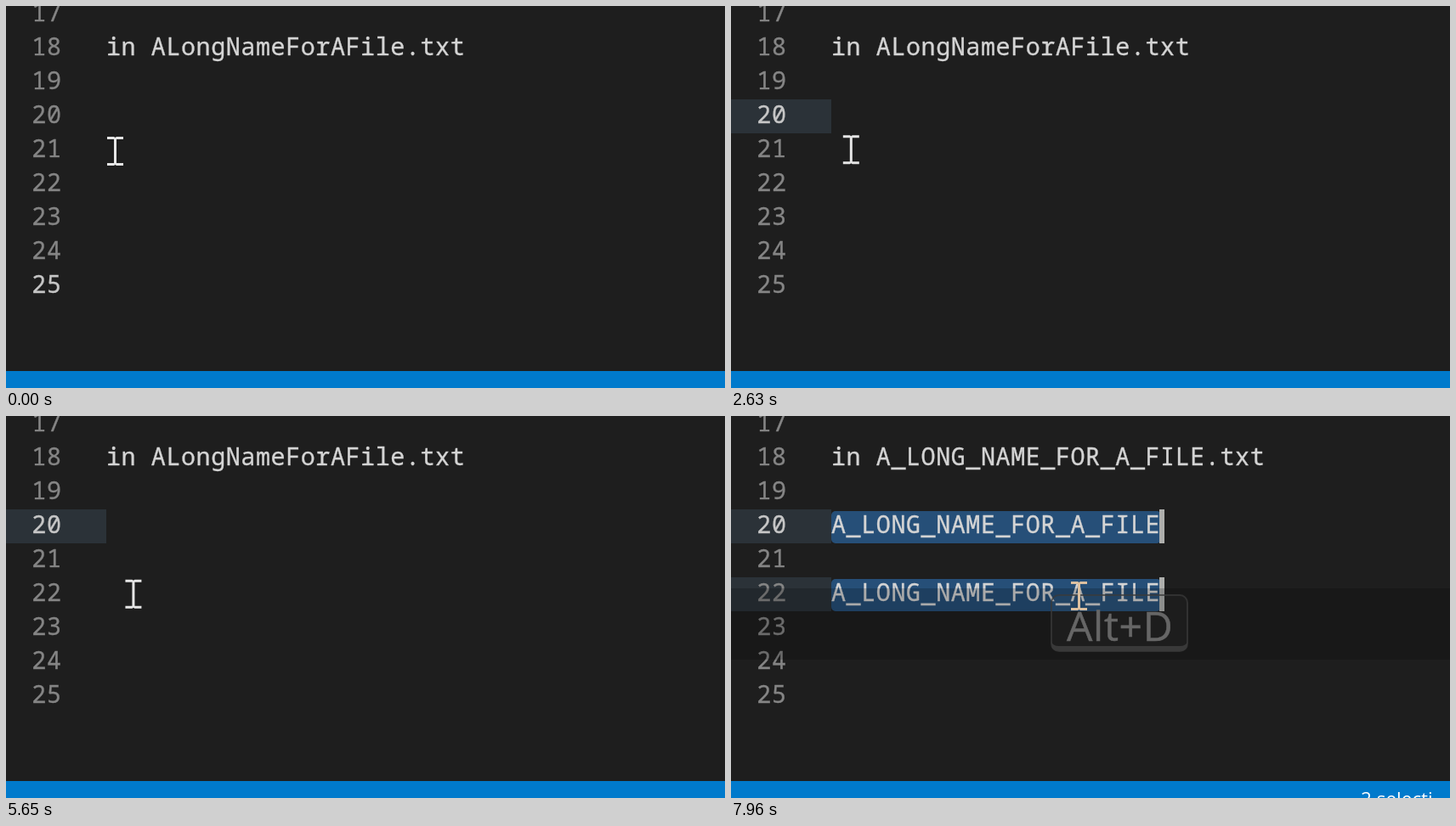
Write an HTML page that moves like this. It is 846x450 px and loops after 8 s.

```html
<!DOCTYPE html>
<html lang="en">
<head>
<meta charset="utf-8">
<title>Editor multi-cursor</title>
<style>
  html, body { margin: 0; width: 100%; height: 100%; overflow: hidden; background: #1e1e1e; }
  svg { display: block; width: 846px; height: 450px; }
  .code {
    font: 28.4px "Noto Sans Mono", "DejaVu Sans Mono", monospace;
    letter-spacing: .56px; white-space: pre;
    fill: #d4d4d4; stroke: #d4d4d4; stroke-width: .35px;
  }
  .num { fill: #858585; stroke: #858585; }
  .active { fill: #c6c6c6; stroke: #c6c6c6; }
  .line { fill: #2b3238; }
  .selection { fill: #264f78; }
  .caret { fill: #aeafad; }
  .ui { font: 22.5px "Open Sans", "Noto Sans", sans-serif; fill: #fff; }
  .key { font: 48px "Open Sans", "Noto Sans", sans-serif; letter-spacing: .7px; fill: #666; stroke: #666; stroke-width: .5px; }
</style>
</head>
<body>
<svg viewBox="0 0 846 450">
  <clipPath id="statusClip"><rect x="730" y="430" width="95" height="20"/></clipPath>
  <rect width="846" height="450" fill="#1e1e1e"/>
  <rect id="line20" class="line" y="110" width="118" height="40"/>
  <rect id="line22" class="line" y="190" width="118" height="40"/>
  <g id="selections">
    <rect class="selection" x="118" y="112" width="388" height="38" rx="5"/>
    <rect class="selection" x="118" y="192" width="388" height="38" rx="5"/>
    <text class="code" x="118" y="138">A_LONG_NAME_FOR_A_FILE</text>
    <text class="code" x="118" y="218">A_LONG_NAME_FOR_A_FILE</text>
  </g>
  <g id="numbers"></g>
  <text id="fileLine" class="code" x="118" y="58"></text>
  <rect id="caret20" class="caret" y="110" width="6" height="40"/>
  <rect id="caret22" class="caret" y="190" width="6" height="40"/>
  <rect y="430" width="846" height="20" fill="#007acc"/>
  <g id="overlay">
    <text class="ui" x="741" y="458.5" clip-path="url(#statusClip)">2 selections</text>
    <rect y="203" width="846" height="84" fill="#000" fill-opacity=".2"/>
    <rect x="377" y="211" width="160" height="66" rx="9" fill="#fff" fill-opacity=".02" stroke="#3a3a3a" stroke-opacity=".75" stroke-width="2"/>
    <path d="M377 265q1 6 9 6h142q8 0 9-6v4q0 8-9 8H386q-9 0-9-8z" fill="#393939"/>
    <text class="key" x="395" y="265">Alt+D</text>
  </g>
  <g id="mouse">
    <path id="arrow" d="M0 0V32L7.3 25.5L12.3 36.5L17.6 34.2L12.8 23.7H23.5Z" fill="#fff" stroke="#000"/>
    <path id="beam" d="M-9.5-17h8l1.5 1 1.5-1h8v3h-8v28h8v3h-8l-1.5-1-1.5 1h-8v-3h8v-28h-8z" fill="#e6e6e6"/>
    <circle id="ring" cx=".5" cy="2" r="22.2" fill="none" stroke="#f00" stroke-width="3.6"/>
    <circle id="press" cx="-3.5" cy="-2" r="24" fill="#ff0" fill-opacity=".49"/>
  </g>
</svg>
<script>
const LOOP = 8000, STEP = 102, BLINK = 490;
const CLICK = 1910, SECOND_CLICK = 6450, RENAME = 7960;
const el = id => document.getElementById(id);
const show = (id, on) => el(id).setAttribute('visibility', on ? 'visible' : 'hidden');

// Each stroke starts where the last one ended and follows a Bezier curve.
const home = [128.5, 171];
const strokes = [
  { at: 100, steps: 1, via: [[129.5, 169]] },
  { at: 590, steps: 8, via: [[102.6, 102.2], [119, 133.5]] },
  { at: 1410, steps: 2, via: [[135.5, 124]] },
  { at: 2210, steps: 7, via: [[181, 140], [110.5, 200]] },
  { at: 3530, steps: 4, via: [[130, 210], [114, 202]] },
  { at: 4030, steps: 8, via: [[-10, 230], [474, 336], [372.5, 346]] },
  { at: 4850, steps: 4, via: [[182.5, 225]] },
  { at: 5350, steps: 7, via: [[134, 203], [134.5, 200]] },
  { at: 6150, steps: 2, via: [[131.5, 212]] },
  { at: 6860, steps: 5, via: [[409.5, 212]] }
];

function bezier(points, u) {
  if (points.length === 1) return points[0];
  return bezier(points.slice(1).map(([x, y], i) =>
    [points[i][0] + (x - points[i][0]) * u, points[i][1] + (y - points[i][1]) * u]), u);
}

function pointer(t) {
  let pos = home;
  for (const { at, steps, via } of strokes) {
    if (t < at) break;
    const step = Math.min(steps, Math.floor((t - at) / STEP) + 1);
    pos = bezier([pos, ...via], step / steps);
  }
  return pos;
}

// A click restarts the blink with a longer first flash.
function caretVisible(t) {
  if (t < CLICK) return false;
  const hidden = t - (t < SECOND_CLICK ? CLICK : SECOND_CLICK) - 620;
  return hidden < 0 || Math.floor(hidden / BLINK) % 2 === 1;
}

const numbers = {};
for (let n = 17; n <= 25; n++) {
  const text = document.createElementNS('http://www.w3.org/2000/svg', 'text');
  text.setAttribute('x', 30.3);
  text.setAttribute('y', 58 + (n - 18) * 40);
  text.textContent = n;
  el('numbers').append(text);
  numbers[n] = text;
}

function draw(t) {
  const focused = t >= CLICK, split = t >= SECOND_CLICK, renamed = t >= RENAME;
  const [x, y] = pointer(t);
  const inGutter = x < 120;
  const caretOn = caretVisible(t);

  el('mouse').setAttribute('transform', `translate(${x} ${y})`);
  show('arrow', inGutter);
  show('beam', !inGutter);
  el('beam').setAttribute('fill', renamed ? '#dcc0a0' : '#e6e6e6');
  show('press', focused && t < CLICK + 100 || split && t < SECOND_CLICK + 200);
  show('ring', t >= SECOND_CLICK + 100 && t < SECOND_CLICK + 200);

  show('line20', focused);
  show('line22', split);
  show('caret20', caretOn);
  show('caret22', caretOn && split);
  for (const id of ['caret20', 'caret22']) el(id).setAttribute('x', renamed ? 504 : 118);
  for (const n in numbers)
    numbers[n].setAttribute('class', +n === (focused ? 20 : 25) ? 'code active' : 'code num');

  show('selections', renamed);
  show('overlay', renamed);
  el('fileLine').textContent = `in ${renamed ? 'A_LONG_NAME_FOR_A_FILE' : 'ALongNameForAFile'}.txt`;
}

const start = performance.now();
function tick() {
  draw((performance.now() - start) % LOOP);
  requestAnimationFrame(tick);
}
tick();
</script>
</body>
</html>
```
